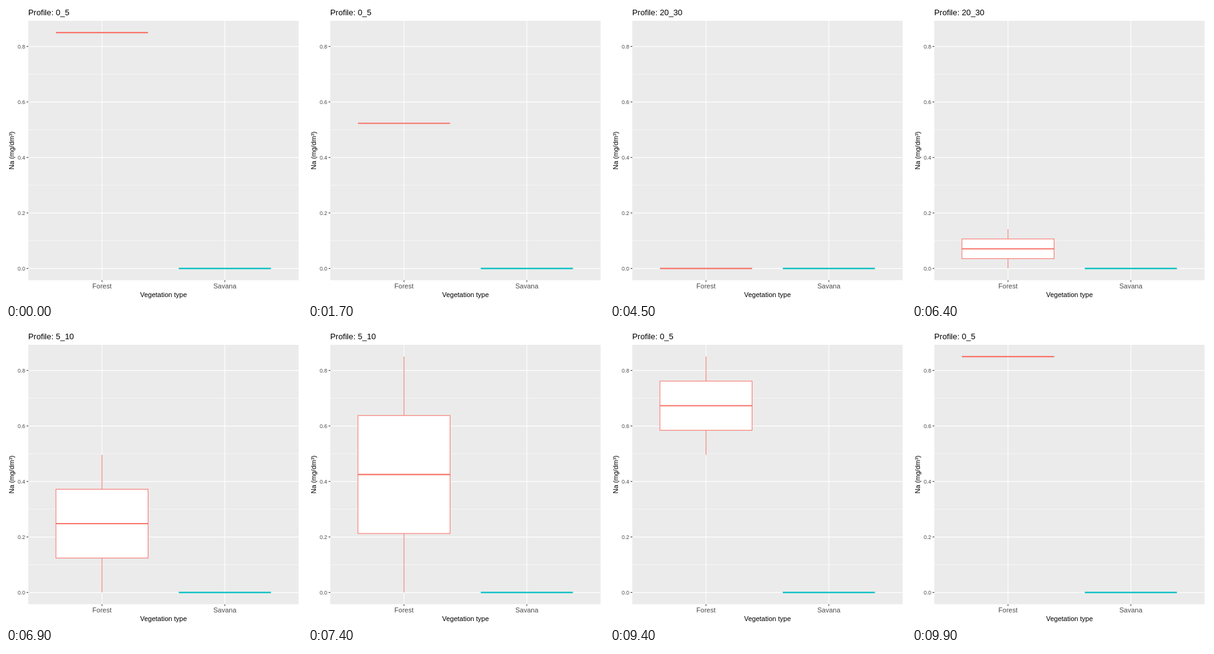
Write an HTML page with a canvas that moves like this. It is 480 by 480 pixels and loops after 10000 ms.

```html
<!DOCTYPE html>
<html lang="en">
<head>
<meta charset="utf-8">
<title>Na by vegetation type</title>
<style>
  html, body { margin: 0; width: 100%; height: 100%; overflow: hidden; background: #fff; }
  canvas { display: block; }
</style>
</head>
<body>
<canvas id="plot" width="480" height="480"></canvas>
<script>
const ctx = document.getElementById('plot').getContext('2d');

const LOOP = 10000, STEP = 100;
const PANEL = { left: 36.2, top: 24, right: 474.5, bottom: 444.7 };
const LINE = 1.07;
const BOX_W = 149.4;
const FOREST = 155.7, SAVANA = 354.9;
const yOf = v => 425.6 - v * 450;

// Each profile: min, lower quartile, median, upper quartile, max
const flat = v => Array(5).fill(v);
const profiles = [
  { name: '0_5', stats: flat(0.85) },
  { name: '10_20', stats: flat(0) },
  { name: '20_30', stats: flat(0) },
  { name: '5_10', stats: [0, 0.2125, 0.425, 0.6375, 0.85] }
];

// Start and end step of the move from each profile to the next
const moves = [[12, 25], [38, 50], [62, 74], [87, 99]];

function stateAt(step) {
  let i = moves.findIndex(m => step < m[1]);
  if (i < 0) return profiles[0];
  const [start, end] = moves[i];
  const from = profiles[i], to = profiles[(i + 1) % profiles.length];
  const p = Math.max(0, (step - start) / (end - start));
  return {
    name: p > 0.5 ? to.name : from.name,
    stats: from.stats.map((v, k) => v + (to.stats[k] - v) * p)
  };
}

function line(x1, y1, x2, y2, color, width) {
  ctx.strokeStyle = color;
  ctx.lineWidth = width;
  ctx.beginPath();
  ctx.moveTo(x1, y1);
  ctx.lineTo(x2, y2);
  ctx.stroke();
}

function text(str, x, y, size, color, align) {
  ctx.font = size + 'px "Liberation Sans", Arial, sans-serif';
  ctx.fillStyle = color;
  ctx.textAlign = align;
  ctx.fillText(str, x, y);
}

function drawAxes() {
  const { left, top, right, bottom } = PANEL;
  ctx.fillStyle = '#ebebeb';
  ctx.fillRect(left, top, right - left, bottom - top);

  for (let i = 0; i < 4; i++) {
    const y = yOf(0.1 + i * 0.2);
    line(left, y, right, y, '#fff', LINE / 2);
  }
  for (let i = 0; i < 5; i++) {
    const v = i * 0.2, y = yOf(v);
    line(left, y, right, y, '#fff', LINE);
    line(left - 2.74, y, left, y, '#333', LINE);
    text(v.toFixed(1), 31.2, Math.round(y + 3.1), 8.8, '#4d4d4d', 'right');
  }
  for (const [x, label] of [[FOREST, 'Forest'], [SAVANA, 'Savana']]) {
    line(x, top, x, bottom, '#fff', LINE);
    line(x, bottom, x, bottom + 2.74, '#333', LINE);
    text(label, x, 458, 11, '#4d4d4d', 'center');
  }

  text('Vegetation type', (left + right) / 2, 472, 11, '#000', 'center');
  ctx.save();
  ctx.translate(13, (top + bottom) / 2);
  ctx.rotate(-Math.PI / 2);
  text('Na (mg/dm³)', 0, 0, 11, '#000', 'center');
  ctx.restore();
}

function drawBox(x, stats, color) {
  const [min, q1, mid, q3, max] = stats.map(yOf);
  const left = x - BOX_W / 2;
  if (min - max > 0.01) {
    line(x, q3, x, max, color, LINE);
    line(x, q1, x, min, color, LINE);
    ctx.fillStyle = '#fff';
    ctx.fillRect(left, q3, BOX_W, q1 - q3);
    ctx.strokeRect(left, q3, BOX_W, q1 - q3);
  }
  line(left, mid, left + BOX_W, mid, color, LINE * 2);
}

function draw() {
  const step = Math.floor((performance.now() % LOOP) / STEP);
  const { name, stats } = stateAt(step);
  ctx.fillStyle = '#fff';
  ctx.fillRect(0, 0, 480, 480);
  drawAxes();
  drawBox(FOREST, stats, '#f8766d');
  drawBox(SAVANA, flat(0), '#00bfc4');
  text('Profile: ' + name, 36, 15, 13.2, '#000', 'left');
  requestAnimationFrame(draw);
}

draw();
</script>
</body>
</html>
```
